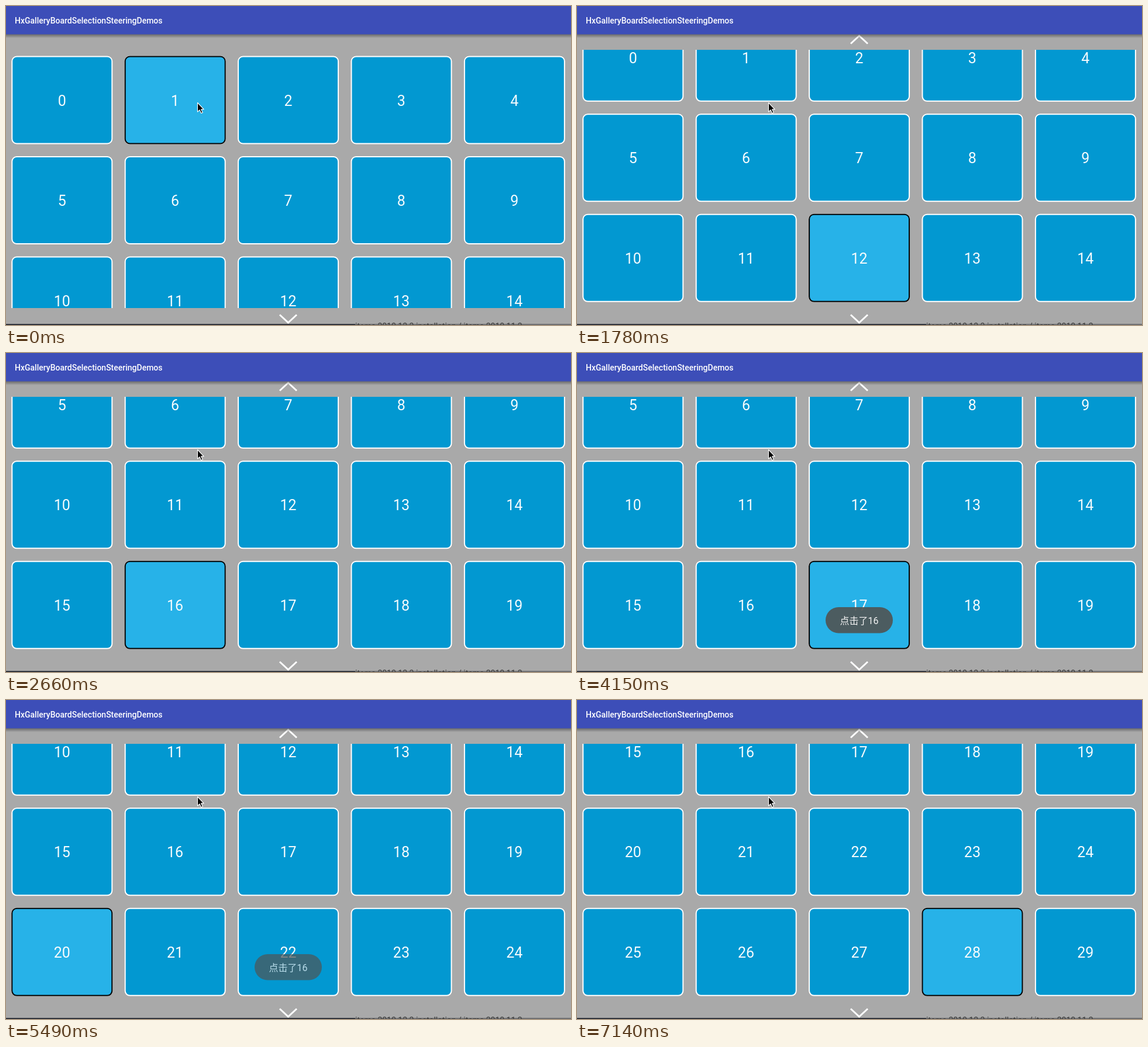
Recreate the animation shown at these times as an HTML page. Size 966 by 546 pixels, loop 8000 ms.

```html
<!DOCTYPE html>
<html lang="en">
<head>
<meta charset="utf-8">
<title>Grid focus navigation</title>
<style>
  html, body { margin: 0; width: 100%; height: 100%; overflow: hidden; background: #a9a9a9; }
  svg { display: block; width: 966px; height: 546px; font-family: Roboto, "Noto Sans CJK SC", "Noto Sans CJK", sans-serif; }
  text { fill: #fff; }
  .title { font-size: 14px; font-weight: 500; }
  .cell { fill: #0298d1; stroke: #fff; stroke-width: 2; }
  .number { font-size: 25px; text-anchor: middle; fill: #f6fbfd; }
  .chevron { fill: none; stroke: #fff; stroke-width: 3; }
  .behind { font-size: 14px; fill: #3a3a3a; }
  .message { font-size: 16px; text-anchor: middle; fill: #f4f4f4; }

  #strip, #focus, #up, #toast { animation: 8s step-end infinite; }
  #strip { animation-name: scroll; }
  #up { animation-name: reveal; }
  #toast { animation-name: toast; }
  #focus {
    fill: #27b2e8;
    stroke: #000;
    transform: translate(calc(var(--c) * 193.4px), calc(var(--r) * 171.5px));
    animation-name: focus;
  }

  @keyframes scroll {
    0% { transform: translateY(0); }
    20.375% { transform: translateY(-72.7px); }
    27.75% { transform: translateY(-172px); }
    29.625% { transform: translateY(-244.2px); }
    63% { transform: translateY(-415.7px); }
    89.25%, 100% { transform: translateY(-587.2px); }
  }
  @keyframes focus {
    0% { --c: 1; --r: 0; }
    13% { --c: 2; --r: 0; }
    16.75% { --c: 2; --r: 1; }
    20.375% { --c: 2; --r: 2; }
    27.75% { --c: 2; --r: 3; }
    33.25% { --c: 1; --r: 3; }
    51.875% { --c: 2; --r: 3; }
    55.625% { --c: 3; --r: 3; }
    59.25% { --c: 4; --r: 3; }
    63% { --c: 0; --r: 4; }
    70.5% { --c: 1; --r: 4; }
    76.125% { --c: 2; --r: 4; }
    81.75% { --c: 3; --r: 4; }
    89.25%, 100% { --c: 3; --r: 5; }
  }
  @keyframes reveal {
    0% { opacity: 0; }
    22.25%, 100% { opacity: 1; }
  }
  @keyframes toast {
    0% { opacity: 0; }
    42.625% { opacity: .3; }
    44.5% { opacity: .75; }
    46.375% { opacity: .97; }
    48.125% { opacity: 1; }
    68.625% { opacity: .76; }
    70.5% { opacity: .3; }
    72.375%, 100% { opacity: 0; }
  }
</style>
</head>
<body>
<svg viewBox="0 0 966 546">
  <defs>
    <clipPath id="view"><rect y="75" width="966" height="442"/></clipPath>
    <linearGradient id="shade" x2="0" y2="1">
      <stop offset="0" stop-opacity=".38"/>
      <stop offset=".5" stop-opacity=".2"/>
      <stop offset="1" stop-opacity="0"/>
    </linearGradient>
  </defs>

  <rect width="966" height="546" fill="#a9a9a9"/>
  <g clip-path="url(#view)">
    <g id="strip">
      <g id="cells"></g>
      <rect id="focus" class="cell" x="10.3" y="86.5" width="171" height="149" rx="8"/>
      <g id="numbers"></g>
    </g>
  </g>

  <path id="up" class="chevron" d="M468 64.5 482.5 51 497 64.5"/>
  <path class="chevron" d="M468 528.5 482.5 542 497 528.5"/>

  <rect y="48" width="966" height="7" fill="url(#shade)"/>
  <rect width="966" height="48.5" fill="#3d4eb8"/>
  <text class="title" x="15" y="30">HxGalleryBoardSelectionSteeringDemos</text>

  <!-- edge of the window behind -->
  <rect y="544" width="966" height="2" fill="#6f7073"/>
  <rect y="544.5" width="597" height="1.5" fill="#20242f"/>
  <text class="behind" x="597" y="553">items 2010 12 2 installation / items 2010 11 2</text>

  <g id="toast">
    <rect x="425" y="435" width="115" height="44.5" rx="22.2" fill="#505655" fill-opacity=".93"/>
    <text class="message" x="482.6" y="463.5">点击了16</text>
  </g>

  <path d="M327.5 165.5V181.2L331 177.8 333.7 183.6 336.3 182.4 333.7 176.9H338.2Z"
        fill="#000" stroke="#fff" stroke-width="1.1" stroke-linejoin="round"/>
</svg>
<script>
  const add = (parent, tag, attrs, text = '') => {
    const node = document.createElementNS('http://www.w3.org/2000/svg', tag);
    for (const key in attrs) node.setAttribute(key, attrs[key]);
    node.textContent = text;
    document.getElementById(parent).append(node);
  };

  for (let i = 0; i < 35; i++) {
    const x = 9.3 + (i % 5) * 193.4;
    const y = 85.5 + Math.floor(i / 5) * 171.5;
    add('cells', 'rect', { class: 'cell', x: x + 1, y: y + 1, width: 171, height: 149, rx: 8 });
    add('numbers', 'text', { class: 'number', x: x + 86.4, y: y + 85 }, i);
  }
</script>
</body>
</html>
```
